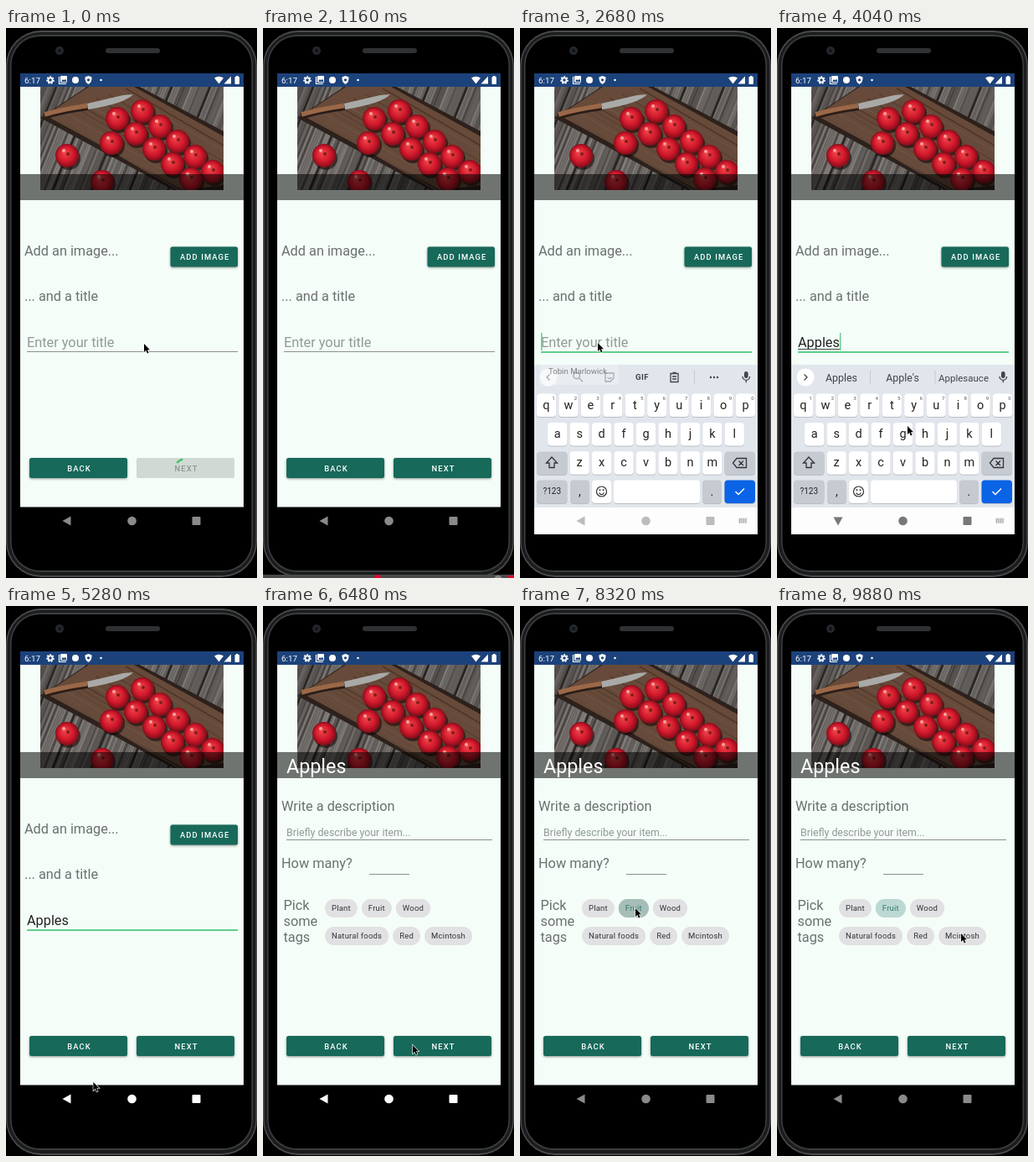
These frames come from a looping animation (300 px wide and 655 px high, 9920 ms). An HTML page with a canvas:

```html
<!DOCTYPE html>
<html lang="en">
<head>
<meta charset="utf-8">
<title>Adding an item</title>
<style>
html, body { margin: 0; width: 100%; height: 100%; overflow: hidden; background: #000; }
canvas { display: block; width: 300px; height: 655px; }
</style>
</head>
<body>
<canvas id="stage"></canvas>
<script>
const canvas = document.getElementById('stage');
const c = canvas.getContext('2d');
const ratio = window.devicePixelRatio || 1;
canvas.width = 300 * ratio;
canvas.height = 655 * ratio;

const LOOP = 9920, FOCUS = 2350, FIRST_KEY = 3050, KEY_GAP = 130, NEXT_PAGE = 6000;
const GREEN = '#17695a', ACCENT = '#5fd08a', GREY = '#6b716e', HINT = '#929a96', LINE = '#8b918e';
const INK = '#3f454b', BLUE = '#1c427b';
const TITLE = 'Apples';
// where the pointer rests, and when it arrives and leaves
const STOPS = [
  { x: 165, y: 376, from: 0, to: 450 },
  { x: 150, y: 662, from: 900, to: 1400 },
  { x: 93, y: 375, from: 2150, to: 3000 },
  { x: 156, y: 474, from: 3900, to: 4150 },
  { x: 74, y: 585, from: 4700, to: 5050 },
  { x: 179, y: 523, from: 5700, to: 6900 },
  { x: 138, y: 360, from: 7900, to: 8650 },
  { x: 220, y: 390, from: 9500, to: LOOP },
];

const clamp = v => Math.min(1, Math.max(0, v));
const ease = (t, from, to) => { const p = clamp((t - from) / (to - from)); return p * p * (3 - 2 * p); };

function seeded(seed) {
  return () => (seed = seed * 16807 % 2147483647) / 2147483647;
}
function box(x, y, w, h, color, r = 0) {
  c.fillStyle = color;
  c.beginPath();
  c.roundRect(x, y, w, h, r);
  c.fill();
}
function disc(x, y, r, color) {
  c.fillStyle = color;
  c.beginPath();
  c.arc(x, y, r, 0, 7);
  c.fill();
}
function ring(x, y, r, color, width, from = 0, to = 7) {
  c.strokeStyle = color;
  c.lineWidth = width;
  c.beginPath();
  c.arc(x, y, r, from, to);
  c.stroke();
}
function fill(path, color) {
  c.fillStyle = color;
  c.fill(new Path2D(path));
}
function stroke(path, color, width = 1.3) {
  c.strokeStyle = color;
  c.lineWidth = width;
  c.stroke(new Path2D(path));
}
function text(s, x, y, size, color = GREY, align = 'left', weight = 400, spacing = 0) {
  c.font = `${weight} ${size}px Roboto, sans-serif`;
  c.letterSpacing = spacing + 'px';
  c.textAlign = align;
  c.fillStyle = color;
  c.fillText(s, x, y);
}
function faded(alpha, draw) {
  c.save();
  c.globalAlpha *= alpha;
  draw();
  c.restore();
}
function within(x, y, w, h, draw) {
  c.save();
  c.beginPath();
  c.rect(x, y, w, h);
  c.clip();
  draw();
  c.restore();
}

function phone() {
  box(0, 0, 300, 655, '#000');
  box(0, 3, 300, 651, '#4a4c4d', 42);
  box(1.5, 5, 297, 647, '#1b1c1d', 40);
  box(5, 8, 290, 640, '#3c3e3f', 36);
  box(6.5, 10, 287, 636, '#000', 34);
  box(119, 24, 65, 6, '#303133', 3);
  disc(64, 27, 5, '#25272b');
  disc(64, 27, 2.2, '#11161f');
}

function statusBar() {
  box(17, 54, 267, 16, BLUE);
  text('6:17', 22, 66, 9.8, '#fff');
  c.setLineDash([2, 1.5]);
  ring(53, 62, 4, '#fff', 1.6);
  c.setLineDash([]);
  ring(53, 62, 2.6, '#fff', 1.8);
  stroke('M63.5 58v8.5h8.5', '#fff', 1.2);
  box(65, 57, 8, 8, '#fff', 1);
  fill('M66 64l2-3l1.5 1.5l1.5-2l1.5 3.5z', BLUE);
  disc(83, 62, 4, '#fff');
  fill('M98.5 57l4 1.6q.5 6-4 8.4q-4.500-2.400-4-8.400z', '#fff');
  disc(98.5, 61.8, 1.6, BLUE);
  disc(113.5, 62, 1.3, '#fff');
  fill('M249 59.500q5.500-3.500 11 0l-5.500 7z', '#fff');
  fill('M269 57.500v9h-8.500z', '#fff');
  box(273.500, 58, 5.500, 9, '#fff', 1);
  box(275, 57, 2.500, 2, '#fff');
}

function apple(x, y) {
  disc(x + 2, y + 3, 14, 'rgba(20,8,8,.6)');
  const skin = c.createRadialGradient(x - 3, y - 4, 1, x, y, 14.5);
  skin.addColorStop(0, '#f0434a');
  skin.addColorStop(.6, '#d0182b');
  skin.addColorStop(1, '#7d0c18');
  disc(x, y, 14, skin);
  disc(x + 1, y - 2, 2, '#7a2018');
  disc(x - 4, y - 6, 2, '#f6a29b');
}

function photo() {
  const random = seeded(11);
  box(41, 70, 219, 123, '#625d59');
  for (let x = 30; x < 330; x += 3) {
    const tone = 65 + random() * 65;
    stroke(`M${x} 70l-50 123`, `rgb(${tone},${tone - 4},${tone - 7})`, 1 + random() * 2);
  }
  for (let x = 60; x < 330; x += 46) stroke(`M${x} 70l-50 123`, '#262422', 2.5);
  fill('M41 107L97 70H160L260 123V193H200z', '#2d211c');
  fill('M47 104L99 70H153L260 129V187L212 193z', '#674a39');
  for (let i = 0; i < 14; i++) {
    const tone = random() * 36;
    stroke(`M${52 + i * 7} ${103 - i * 2.4}l160 93`, `rgb(${75 + tone},${52 + tone},${38 + tone})`, 1.5);
  }
  stroke('M46 105Q66 98 98 94', '#2a1d18', 8);
  stroke('M46 103Q66 97 97 92.500', '#9b6848', 5.5);
  fill('M97 90L140 80L152 79Q142 90 98 97z', '#a9aaa8');
  for (let i = 0; i < 5; i++) {
    apple(163 + 21 * i, 99 + 18 * i);
    apple(133 + 22 * i, 108 + 18 * i);
  }
  apple(126, 137);
  apple(73, 152);
  apple(115, 183);
}

function button(label, x, y, w, enabled = true) {
  c.save();
  if (enabled) {
    c.shadowColor = 'rgba(0,0,0,.4)';
    c.shadowBlur = 3 * ratio;
    c.shadowOffsetY = ratio;
  }
  box(x, y, w, 24, enabled ? GREEN : '#d0d9d4', 2.5);
  c.restore();
  text(label, x + w / 2 + 1, y + 15.8, 9.4, enabled ? '#fff' : '#8c9591', 'center', 500, 1.1);
}

function footer(nextReady = true) {
  button('BACK', 28, 512, 117);
  button('NEXT', 156, 512, 117, nextReady);
}

function spinner(t) {
  const p = t % 1333 / 1333, start = -2.45 + p * 2.2;
  ring(215, 527, 14, '#43c46b', 2.5, start + ease(p, .5, 1) * 4.6, start + .6 + ease(p, 0, .5) * 4.6);
}

function titlePage(t) {
  const ready = t > 800, focused = t > FOCUS;
  const typed = TITLE.slice(0, Math.max(0, Math.floor((t - FIRST_KEY) / KEY_GAP) + 1));
  text('Add an image...', 22, 271, 16.3);
  button('ADD IMAGE', 196.5, 260.5, 80.5);
  text('... and a title', 22, 325, 16.3);
  text(typed || 'Enter your title', 25, 380, 16.3, typed ? '#222' : HINT);
  const end = 25 + (typed && c.measureText(typed).width);
  if (typed && t < 4850) box(25, 382, end - 25, 1, '#444');
  box(25, 385, 252, focused ? 2 : 1, focused ? ACCENT : LINE);
  const lastInput = typed ? Math.min(t, FIRST_KEY + KEY_GAP * 5) : FOCUS;
  if (focused && (t - lastInput) % 1000 < 500) box(end, 363, 1.5, 21, ACCENT);
  footer(ready);
  if (!ready) spinner(t);
}

// lays chips out from left to right
function chips(labels, y, t) {
  let x = 74;
  for (const label of labels) {
    text('', 0, 0, 9.5, GREY, 'center', 400, .2);
    const w = c.measureText(label).width + 16;
    const picked = label === 'Fruit' ? ease(t, 8150, 8280) : 0;
    const pressed = picked * (1 - ease(t, 8400, 8700));
    box(x, y - 11, w, 22, '#e1e0e2', 11);
    faded(picked, () => box(x, y - 11, w, 22, '#bcd8d2', 11));
    faded(pressed, () => box(x, y - 11, w, 22, '#a6bdb8', 11));
    text(label, x + w / 2, y + 3.4, 9.5, picked ? '#2f7d6d' : '#343536', 'center', 400, .2);
    x += w + 5;
  }
}

function detailPage(t) {
  text(TITLE, 28, 199, 23.3, '#fff');
  text('Write a description', 22, 244, 16.3);
  text('Briefly describe your item...', 28, 274, 12.37, HINT);
  box(28, 278, 246, 1, LINE);
  text('How many?', 22, 312, 16.3);
  box(127, 319, 48, 1, LINE);
  ['Pick', 'some', 'tags'].forEach((s, i) => text(s, 24.5, 362 + i * 19, 16.3));
  chips(['Plant', 'Fruit', 'Wood'], 360, t);
  chips(['Natural foods', 'Red', 'Mcintosh'], 393, t);
  footer();
}

function navBar(t, light) {
  box(17, 571, 267, 32, light ? '#fdfdfd' : '#000');
  const bright = ease(t, 5050, 5200) * (1 - ease(t, 6800, 7100));
  const shade = light ? 190 - 70 * ease(t, 2650, 3000) : 138 + 117 * bright;
  const color = `rgb(${shade},${shade},${shade})`;
  c.save();
  c.translate(73, 587);
  if (light) c.rotate(-Math.PI / 2 * ease(t, 2720, 2950));
  fill('M-5.500 0l10-5.500v11z', color);
  c.restore();
  disc(150.5, 587, 5.3, color);
  box(222.5, 582, 10, 10, color, 1);
  if (light) {
    box(261, 583.5, 10.5, 6, '#ddd', 1);
    for (let i = 0; i < 12; i++) box(262 + i % 4 * 2.4, 584.5 + (i >> 2) * 2, 1.2, 1, '#888');
  }
}

function strip(t) {
  const count = Math.floor((t - FIRST_KEY) / KEY_GAP) + 1;
  disc(34, 416, 10.5, '#fff');
  box(268, 409, 4.6, 8, INK, 2.3);
  stroke('M266 415a4.300 4.300 0 0 0 8.600 0M270.300 419.300v3', INK);
  if (count > 0) {
    stroke('M32.500 412.500l3.500 3.500l-3.500 3.500', INK);
    text(TITLE.slice(0, count), 77, 420.5, 12.4, INK, 'center');
    text("Apple's", 150, 420.5, 12.4, INK, 'center');
    text('Applesauce', 223, 420.5, 11.5, INK, 'center');
    box(111, 408, 1, 16, '#c5cacf');
    box(188.5, 408, 1, 16, '#c5cacf');
    return;
  }
  stroke('M35.500 412.500l-3.500 3.500l3.500 3.500', INK);
  ring(67.7, 414, 3.7, INK, 1.4);
  stroke('M70.500 416.700l4.500 4.500', INK);
  stroke('M102 411h10v6l-4 4h-6zM104.500 416q2 3 5 0', INK);
  text('GIF', 146, 419, 9.6, INK, 'center', 700, .5);
  stroke('M180 411.500h9v10h-9zM182.500 410.500h4M182 415h5M182 418h5', INK);
  box(208, 408, 1, 16, '#c5cacf');
  for (let x = 228; x <= 236; x += 4) disc(x, 416, 1.2, INK);
  faded(1 - ease(t, 2660, 2900), () => {
    box(24, 401, 94, 24, 'rgba(240,243,245,.6)', 3);
    text('Tobin Marlowick', 34, 412, 9.6, '#777d80');
  });
}

function key(x, y, w, label = '', color = '#fff', size = 14.5) {
  box(x, y - 12.5, w, 27.5, '#b9bec5', 4);
  box(x, y - 13.5, w, 27.5, color, 4);
  text(label, x + w / 2, y + size * .32, size, '#222', 'center');
}

function keyboard(t) {
  const side = '#c6cbd2';
  box(17, 401, 267, 170, '#e1e6ec');
  strip(t);
  ['qwertyuiop', 'asdfghjkl', 'zxcvbnm'].forEach((letters, row) =>
    [...letters].forEach((letter, i) => {
      const x = 150.5 + (i - (letters.length - 1) / 2) * 26.45, y = 449 + row * 34.4;
      key(x - 11.6, y, 23.2, letter);
      if (!row) text((i + 1) % 10, x + 8.5, y - 6, 6.2, '#555', 'center');
    }));
  key(20, 518, 36.5, '', side);
  stroke('M38 511l-6.500 7h3.500v5.500h6v-5.500h3.500z', '#333');
  key(244.5, 518, 36.5, '', side);
  stroke('M259 512.500h11.500v11h-11.500l-4.500-5.500zM261.500 515.500l5.500 5.500m0-5.500l-5.500 5.500', '#333');
  key(20, 552, 36.5, '?123', side, 10);
  key(60, 552, 23, ',', side);
  key(86, 552, 23);
  ring(97.5, 552, 6, '#333', 1.2);
  ring(97.5, 552.5, 3, '#333', 1.2, .3, 2.8);
  disc(95.5, 550.3, 1, '#333');
  disc(99.5, 550.3, 1, '#333');
  key(112, 552, 103);
  key(218, 552, 23, '.', side);
  key(244.5, 552, 36.5, '', '#0b63e5');
  stroke('M257.500 552l3.500 3.500l7-7', '#fff', 1.5);
}

function playerBar() {
  box(0, 651, 300, 4, '#4a4a4a');
  disc(137, 655, 4, '#e0092b');
  disc(281, 657, 5, '#888');
  box(293, 652, 6, 3, '#e0092b');
}

function pointer(t) {
  const i = STOPS.findLastIndex(s => s.from <= t);
  const a = STOPS[i], b = STOPS[i + 1] || a;
  const p = ease(t, a.to, b.from);
  c.save();
  c.translate(a.x + (b.x - a.x) * p, a.y + (b.y - a.y) * p);
  const arrow = 'M0 0V10L2.300 7.800L3.900 11.500L5.500 10.800L4 7.200H7z';
  stroke(arrow, '#fff', 1.2);
  fill(arrow, '#000');
  c.restore();
}

function draw(now) {
  const t = now % LOOP;
  const open = ease(t, 2400, 2600) * (1 - ease(t, 4850, 5030));
  c.setTransform(ratio, 0, 0, ratio, 0, 0);
  phone();
  box(17, 54, 267, 516.5, '#f4fdf8');
  statusBar();
  within(41, 70, 219, 123, photo);
  box(17, 174, 267, 31, 'rgba(0,0,0,.54)');
  (t < NEXT_PAGE ? titlePage : detailPage)(t);
  if (open) within(17, 70, 267, 501, () => {
    c.translate(0, (1 - open) * 170);
    keyboard(t);
  });
  navBar(t, open > 0);
  if (t > 850 && t < 1500) playerBar();
  pointer(t);
  requestAnimationFrame(draw);
}
requestAnimationFrame(draw);
</script>
</body>
</html>
```
